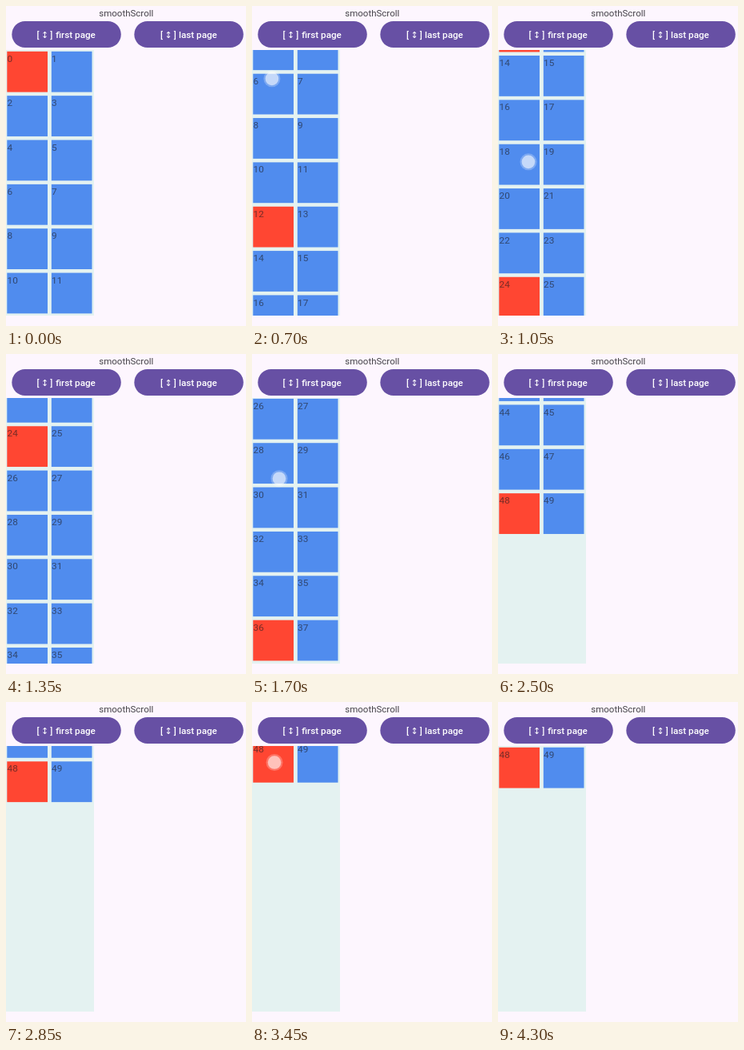
Recreate the animation shown at these times as an HTML page. Size 300 px wide and 400 px high, loop 4350 ms.

```html
<!DOCTYPE html>
<html lang="en">
<head>
<meta charset="utf-8">
<title>smoothScroll</title>
<style>
  html, body { margin: 0; width: 100%; height: 100%; overflow: hidden; background: #fdf6fe; }
  svg { display: block; width: 300px; height: 400px; font-family: Roboto, "Open Sans", sans-serif; }
  .title { font-size: 11.5px; fill: #454349; }
  .button { font-size: 11.7px; font-weight: 500; fill: #fff; }
  .button rect { fill: #6750a4; }
  .bracket { font-size: 11px; }
  .arrow { font: 11px "DejaVu Sans", sans-serif; }
  .tile { fill: #508cee; }
  .tile.first { fill: #ff4632; }
  .num { font-size: 11.8px; fill: #1d1b20; fill-opacity: .6; }
</style>
</head>
<body>
<svg viewBox="0 0 300 400">
  <defs>
    <clipPath id="view"><rect y="55" width="110" height="332"/></clipPath>
    <g id="brackets">
      <text class="bracket" x="31.2" y="20.8">[</text>
      <text class="arrow" x="41.2" y="20.8" text-anchor="middle">↕</text>
      <text class="bracket" x="51" y="20.8" text-anchor="end">]</text>
    </g>
  </defs>
  <rect width="300" height="400" fill="#fdf6fe"/>
  <text class="title" x="150.3" y="13" text-anchor="middle">smoothScroll</text>
  <g class="button" transform="translate(7.3 19)">
    <rect width="136.5" height="33" rx="16.5"/>
    <use href="#brackets"/>
    <text x="55" y="21.2">first page</text>
  </g>
  <g class="button" transform="translate(160.3 19)">
    <rect width="136.5" height="33" rx="16.5"/>
    <use href="#brackets" x="1.5"/>
    <text x="55.6" y="21.2">last page</text>
  </g>
  <g clip-path="url(#view)">
    <rect y="55" width="110" height="332" fill="#e4f2f1"/>
    <g id="grid"></g>
  </g>
  <g id="touch" fill="#fff">
    <circle r="10.5" fill-opacity=".25"/>
    <circle r="8.3" fill-opacity=".56"/>
  </g>
</svg>
<script>
const LOOP = 4350, STEP = 50, ROW = 55.35, PAGE = ROW * 6, SLOP = 3;
const grid = document.getElementById('grid');
const touch = document.getElementById('touch');

// Each swipe: press, drag start, release (ms), finger path, settle time constant
const swipes = [
  { down: 420,  drag: 480,  up: 730,  x: [23, 25], y: [232, 85], tau: 70 },
  { down: 960,  drag: 990,  up: 1130, x: [36, 41], y: [248, 113], tau: 123 },
  { down: 1580, drag: 1620, up: 1790, x: [34, 34], y: [215, 85], tau: 85 },
  { down: 2130, drag: 2200, up: 2400, x: [40, 26], y: [200, 67], tau: 184 },
  { down: 3120, drag: 3180, up: 3480, x: [30, 28], y: [232, 71], tau: 120, edge: true }
];

function add(name, attrs, text) {
  const el = document.createElementNS('http://www.w3.org/2000/svg', name);
  for (const key in attrs) el.setAttribute(key, attrs[key]);
  if (text !== undefined) el.textContent = text;
  grid.append(el);
}

for (let i = 0; i < 50; i++) {
  const x = i % 2 ? 56.8 : 1.3, y = 56.8 + Math.floor(i / 2) * ROW;
  add('rect', { class: i % 12 ? 'tile' : 'tile first', x, y, width: 50.7, height: 50.8 });
  add('text', { class: 'num', x: x + .3, y: y + 13.1 }, i);
}

const mix = ([a, b], k) => a + (b - a) * k;

function progress(s, t) {
  const u = Math.min(1, Math.max(0, (t - s.drag) / (s.up - s.drag)));
  return u * u * (3 - 2 * u);
}

function pulled(s, t) {
  const d = Math.max(0, s.y[0] - mix(s.y, progress(s, t)) - SLOP);
  return s.edge ? d * .045 : d;
}

function scrollAt(t) {
  const n = swipes.findLastIndex(s => t >= s.drag);
  if (n < 0) return 0;
  const s = swipes[n], base = n * PAGE;
  if (t < s.up) return base + pulled(s, t);
  const goal = s.edge ? base : base + PAGE;
  return goal + (base + pulled(s, s.up) - goal) * Math.exp((s.up - t) / s.tau);
}

function draw(now) {
  const t = Math.floor(now % LOOP / STEP) * STEP;
  grid.setAttribute('transform', `translate(0 ${-scrollAt(t).toFixed(2)})`);
  const s = swipes.find(s => t >= s.down && t < s.up);
  touch.style.display = s ? '' : 'none';
  if (s) {
    const k = progress(s, t);
    touch.setAttribute('transform', `translate(${mix(s.x, k)} ${mix(s.y, k)})`);
  }
}

const start = performance.now();
function tick() {
  draw(performance.now() - start);
  requestAnimationFrame(tick);
}
tick();
</script>
</body>
</html>
```
